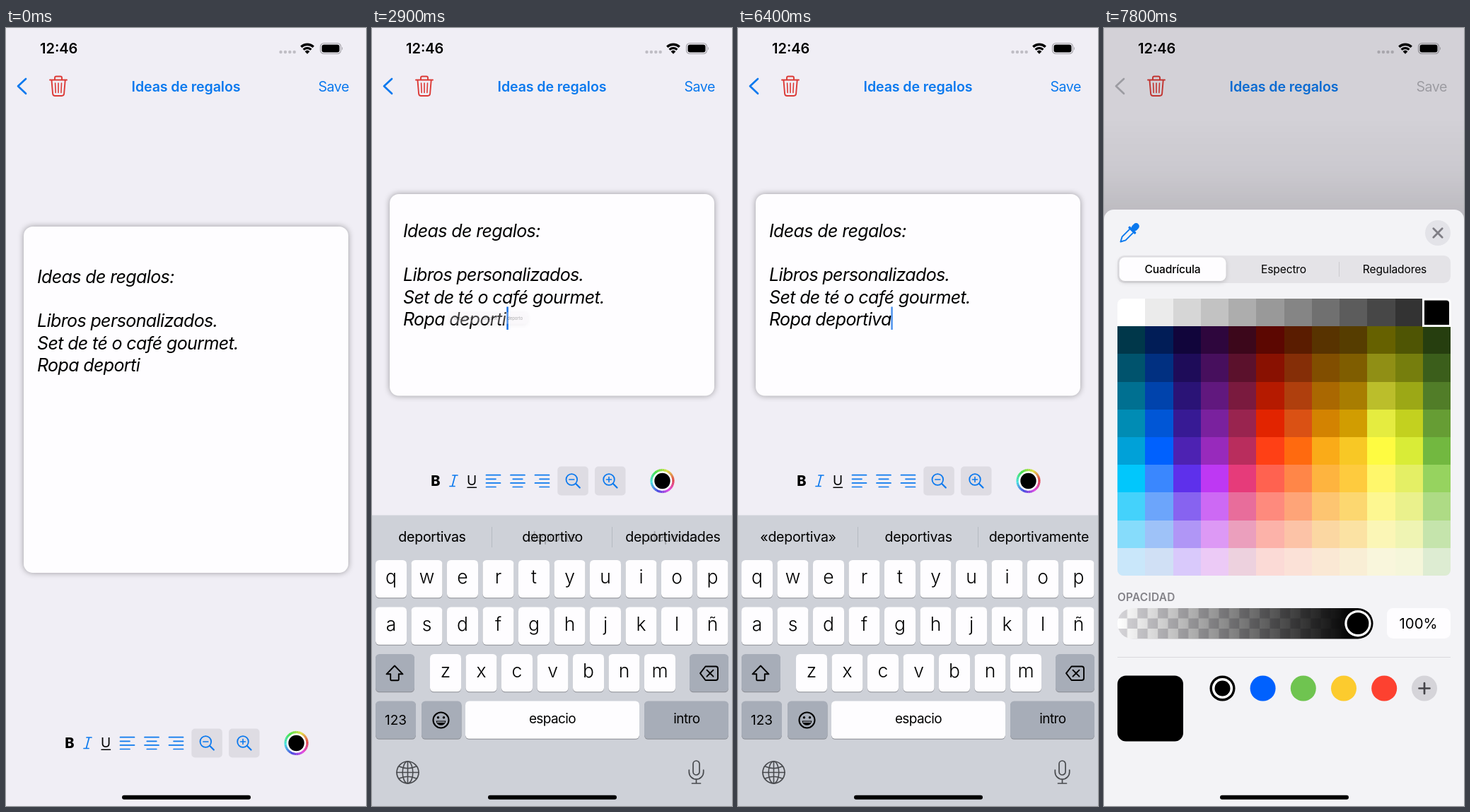
Animation of 509 by 1101 pixels, one loop 8 s. Source, as an HTML page:

```html
<!DOCTYPE html>
<html lang="es">
<head>
<meta charset="utf-8">
<title>Nota</title>
<style>
html, body { margin: 0; width: 100%; height: 100%; overflow: hidden; background: #f0eef5; }
svg { display: block; width: 100%; height: 100%; --blue: #0b79ee; }
text { font-family: Inter, Roboto, sans-serif; white-space: pre; }
.mid { text-anchor: middle; }
.end { text-anchor: end; }
.line { fill: none; stroke: currentColor; stroke-linecap: round; stroke-linejoin: round; }
.blue { color: var(--blue); }
.note text { font-size: 25px; font-style: italic; letter-spacing: -.62px; }
.hint text { font-size: 19.6px; letter-spacing: -.3px; }
.key { filter: drop-shadow(0 1.5px 0 #8a8c92); }

/* Critically damped spring, sampled evenly */
.spring {
  animation: 8s infinite linear(0, .09, .264, .442, .594, .713, .801, .864, .908, .939, .96, .973, .983, .989, 1);
}
.kb { animation-name: kb; }
.bar { animation-name: bar; }
.note { animation-name: note; }
.card { animation-name: card; fill: #fefdff; filter: drop-shadow(0 0 4.5px rgba(0,0,0,.36)); }
@keyframes kb {
  0%, 18.56% { transform: translateY(412px); }
  27.31%, 88.06% { transform: none; }
  96.81%, 100% { transform: translateY(412px); }
}
@keyframes bar {
  0%, 19.28% { transform: translateY(371px); }
  28.03%, 88.06% { transform: none; }
  96.81%, 100% { transform: translateY(371px); }
}
@keyframes note {
  0%, 19.28% { transform: translateY(65px); }
  28.03%, 88.06% { transform: none; }
  96.81%, 100% { transform: translateY(65px); }
}
@keyframes card {
  0%, 19.28% { y: 281px; height: 490px; }
  28.03%, 88.06% { y: 235px; height: 285.5px; }
  96.81%, 100% { y: 281px; height: 490px; }
}

.caret { animation: blink 8s linear infinite, step 8s step-end infinite; }
@keyframes blink {
  0%, 34.99% { opacity: 0; }
  35%, 40.9% { opacity: 1; }
  43.75%, 45.6% { opacity: 0; }
  48.75%, 68.1% { opacity: 1; }
  70.6% { opacity: 0; }
  73.75%, 79.6% { opacity: 1; }
  81.25%, 83.1% { opacity: 0; }
  86.25%, 88.1% { opacity: 1; }
  88.2%, 100% { opacity: 0; }
}
@keyframes step {
  0% { transform: none; }
  52.5% { transform: translateX(13.3px); }
  61.25% { transform: translateX(26px); }
}

.menu { transform-box: fill-box; transform-origin: center; animation: menu 8s ease-out infinite; }
.menu text { font-size: 16.8px; font-style: normal; letter-spacing: -.5px; }
@keyframes menu {
  0%, 22.5% { opacity: 0; transform: translate(-18px, 23.5px) scale(.37); }
  24.8%, 33.9% { opacity: 1; transform: none; }
  36.2%, 38.74% { opacity: .32; transform: translate(-18px, 23.5px) scale(.37); }
  38.75%, 100% { opacity: 0; transform: translate(-18px, 23.5px) scale(.37); }
}

.sheet, .dim, .tint { animation: 8s cubic-bezier(.3, .08, .32, 1) infinite; }
.sheet { animation-name: sheet; }
.dim { animation-name: dim; }
.tint { animation-name: tint; }
@keyframes sheet {
  0%, 92.04% { opacity: 0; transform: translateY(844px); }
  92.05% { opacity: 1; transform: translateY(844px); animation-timing-function: cubic-bezier(.4, .2, .7, .8); }
  93.75% { opacity: 1; transform: translateY(164px); animation-timing-function: ease-out; }
  95%, 97.49% { opacity: 1; transform: translateY(27px); }
  97.5%, 100% { opacity: 1; transform: none; }
}
@keyframes dim {
  0%, 92.05% { opacity: 0; }
  95%, 97.49% { opacity: .116; }
  97.5%, 100% { opacity: .12; }
}
@keyframes tint {
  0%, 92.05% { color: #0b79ee; }
  95%, 100% { color: #b2b1b8; }
}
</style>
</head>
<body>
<svg id="stage" viewBox="0 0 509 1101"></svg>
<script>
const LOOP = 8000;
let rules = '', ruleCount = 0;

// Style that shows an element only between two times in ms
function show(from, to, level = 1) {
  const name = 'show' + ruleCount++;
  const pct = ms => (ms / LOOP * 100).toFixed(3) + '%';
  rules += `@keyframes ${name}{0%{opacity:0}${pct(from)}{opacity:${level}}` +
    (to < LOOP ? `${pct(to)}{opacity:0}` : '') + '}';
  return `style="animation:${name} ${LOOP}ms step-end infinite"`;
}
const text = (x, y, str, attrs = '') => `<text x="${x}" y="${y}" ${attrs}>${str}</text>`;
const mid = (x, y, str, attrs = '') => text(x, y, str, `class="mid" ${attrs}`);
const rect = (x, y, w, h, r, fill, attrs = '') =>
  `<rect x="${x}" y="${y}" width="${w}" height="${h}" rx="${r}" fill="${fill}" ${attrs}/>`;
const disc = (x, y, r, fill) => `<circle cx="${x}" cy="${y}" r="${r}" fill="${fill}"/>`;
const line = (d, width = 2, attrs = '') => `<path class="line" d="${d}" stroke-width="${width}" ${attrs}/>`;
const each = (list, fn) => [...list].map(fn).join('');
const range = (n, fn) => Array.from({ length: n }, (_, i) => fn(i)).join('');

const statusBar = () =>
  text(48, 36, '12:46', 'font-size="20" font-weight="600"') +
  range(4, i => disc(388.5 + i * 6.4, 34, 2.2, '#bfbdc4')) +
  line('M417.3 26.8a12.5 12.5 0 0 1 17.4 0', 3.4, 'style="stroke-linecap:butt"') +
  line('M420.6 30.6a7.8 7.8 0 0 1 10.8 0', 3.2, 'style="stroke-linecap:butt"') +
  '<path d="M426 36.8l-3.4-3.6a5 5 0 0 1 6.8 0z"/>' +
  rect(444.5, 21.5, 29, 15, 5, 'none', 'stroke="#a5a3a9" stroke-width="1.2"') +
  rect(446.5, 23.5, 25, 11, 3.2, '#000') +
  '<path d="M475 26.5q2 2.5 0 5z" fill="#a5a3a9"/>';

const navBar = () =>
  `<g class="tint">${line('M28 72L17 82.3L28 92.7', 2.7)}` +
  text(485, 89.5, 'Save', 'class="end" fill="currentColor" font-size="19.6" letter-spacing="-.45"') + '</g>' +
  '<g color="#dc3a36">' + line('M62 73.5H86M69 73v-2.5q0-2 2-2h6q2 0 2 2V73' +
    'M64.5 74l1.6 19q.3 3 3.3 3h9.4q3 0 3.3-3l1.6-19', 1.9) +
  line('M69.6 78l.6 13.5M74 78v13.5M78.5 78l-.6 13.5', 1.6) + '</g>' +
  mid(254.5, 89.5, 'Ideas de regalos',
    'fill="var(--blue)" font-size="19.6" font-weight="600" letter-spacing="-.1"');

function note() {
  const lines = [296, 358.4, 389.6, 420.8];
  const last = (word, from, to) => text(44, lines[3], 'Ropa ' + word, show(from, to));
  const menu = '<g class="menu">' +
    rect(33, 365, 299, 44, 11, 'rgba(246,244,247,.87)', 'style="filter:drop-shadow(0 4px 10px rgba(0,0,0,.2))"') +
    '<path d="M141 365v44M236.5 365v44" stroke="#dcdadf"/>' +
    mid(87, 393.5, 'deportivo') + mid(188.5, 393.5, 'deporte') + mid(284, 393.5, 'deporto') + '</g>';
  return '<rect class="spring card" x="25" y="281" width="459" height="490" rx="13"/>' +
    '<g class="spring note">' +
    rect(109, 393, 83, 34, 0, '#fccbcd', show(1850, 2800)) +
    rect(107, 393.5, 98.5, 35.5, 0, '#cde3f5', show(4300, 4900)) +
    text(44, lines[0], 'Ideas de regalos:') +
    text(44, lines[1], 'Libros personalizados.') +
    text(44, lines[2], 'Set de té o café gourmet.') +
    last('deporti', 0, 4200) + last('deportiv', 4200, 4900) + last('deportiva', 4900, LOOP) +
    rect(190.3, 394.5, 2.5, 32.5, 0, '#146fe6', 'class="caret"') + menu + '</g>';
}

function toolBar() {
  // Alignment: 0 left, .5 centre, 1 right
  const align = (x, side) => line(range(4, i => {
    const w = i % 2 ? 13.5 : 20;
    return `M${x + (20 - w) * side} ${632.7 + i * 5.6}h${w}`;
  }), 1.7);
  const zoom = (x, sign) => rect(x, 620.5, 43.5, 41, 5, '#dedce3') +
    line(`M${x + 26} ${645}l5.5 5.5`, 2.2) +
    `<circle class="line" cx="${x + 20}" cy="639" r="7.8" stroke-width="1.8"/>` +
    line(`M${x + 16.5} 639h7` + (sign ? `M${x + 20} 635.5v7` : ''), 1.6);
  const ring = range(36, i => `<path d="M-.1 -15.4h2.9" transform="translate(410.5 641) rotate(${i * 10})"
    stroke="hsl(${80 - i * 10} 72% 58%)" stroke-width="3.2"/>`);
  return '<g class="spring bar">' + mid(90, 648.3, 'B', 'font-size="20" font-weight="800"') +
    mid(141, 647, 'U', 'font-size="19"') + line('M135 650.3h12.5', 1.5) +
    '<g class="blue">' + line('M114 633h7M110 648.5h7M117.6 633l-4.2 15.5', 1.7) +
    align(161.5, 0) + align(196, .5) + align(230.5, 1) + zoom(262.3, 0) + zoom(315, 1) + '</g>' +
    disc(410.5, 641, 15, '#fff') + ring + disc(410.5, 641, 11.2, '#000') + '</g>';
}

function keyboard() {
  const pitch = 50.5, grey = '#a7adb8';
  const key = (x, y, w, fill = '#fefdff') => rect(x, y, w, 53.3, 5.5, fill, 'class="key"');
  const row = (letters, x0, y) => each(letters, (c, i) =>
    key(x0 + i * pitch, y, 44) + mid(x0 + 22 + i * pitch, y + 33.3, c, 'font-size="26.5" font-weight="350"'));
  const hints = (words, attrs, boxed) => `<g class="hint" ${attrs}>` +
    (boxed ? rect(170, 697, 170, 46, 6, '#e7e7ec')
      : '<path d="M169.5 706v29M339.5 706v29" stroke="#b6bac2"/>') +
    words.split(' ').map((w, i) => mid(85 + i * 170.2, 727, w)).join('') + '</g>';
  const bubble = (c, x, y, left, from) => `<g ${show(from, from + 120)}>` +
    `<g fill="#fefdff" style="filter:drop-shadow(0 1px 2px rgba(0,0,0,.3))">` +
    `<path d="M${left + 10} ${y - 70}h48q10 0 10 10v38q0 8-6 13L${x + 44} ${y + 8}V${y + 48}q0 5-5 5` +
    `H${x + 5}q-5 0-5-5V${y + 8}L${left + 6} ${y - 9}q-6-5-6-13v-38q0-10 10-10z"/></g>` +
    mid(left + 34, y - 27, c, 'font-size="42" font-weight="300"') + '</g>';
  const first = 'deportivas deporte deporto';
  const small = 'font-size="19" letter-spacing="-.6"';
  return '<g class="spring kb">' + rect(0, 689.5, 509, 420, 0, '#ced1d8') +
    hints(first, show(0, 2900)) + hints(first, show(2900, 3100, .22)) +
    hints('deportivas deportivo deportividades', show(2900, 4300)) +
    hints('«deportiv» deportiva deportivas', show(4300, 5000), true) +
    hints('«deportiva» deportivas deportivamente', show(5000, LOOP)) +
    row('qwertyuiop', 5, 753) + row('asdfghjklñ', 5, 819.5) + row('zxcvbnm', 82, 886) +
    key(5, 886, 55, grey) + key(449, 886, 55, grey) +
    key(5, 952.5, 57, grey) + key(70, 952.5, 56.5, grey) +
    key(132, 952.5, 246, '#fefdff') + key(385, 952.5, 119, grey) +
    line('M32 902.5L43.5 914.3H37.8V922q0 1.3-1.3 1.3h-9q-1.3 0-1.3-1.3v-7.7H20.5z', 1.9) +
    line('M471.5 903.5H486q3 0 3 3V920q0 3-3 3H471.5L464 913.2zM473.5 908.7l9 9M482.5 908.7l-9 9', 1.9) +
    mid(33.5, 986, '123', 'font-size="19"') +
    mid(255, 984, 'espacio', small) + mid(445, 984, 'intro', small) +
    '<circle class="line" cx="97.5" cy="979.5" r="11" stroke-width="2"/>' +
    disc(93.5, 975.8, 1.7, '#000') + disc(101.5, 975.8, 1.7, '#000') +
    '<path d="M90.5 980.5h14q-1.2 6.3-7 6.3t-7-6.3z"/><path d="M92 982.3h11" stroke="#a7adb8" stroke-width="1.4"/>' +
    '<g color="#484a4e"><circle class="line" cx="50.5" cy="1053.5" r="15.5" stroke-width="1.7"/>' +
    '<ellipse class="line" cx="50.5" cy="1053.5" rx="7.3" ry="15.5" stroke-width="1.6"/>' +
    line('M50.5 1038v31M35 1053.5h31M38.5 1045q12 5.5 24 0M38.5 1062q12-5.5 24 0', 1.6) +
    line('M454 1041.5a4.5 4.5 0 0 1 9 0v11a4.5 4.5 0 0 1-9 0zM448.3 1050v3a10.2 10.2 0 0 0 20.4 0v-3' +
      'M458.5 1063.5v5M452.5 1069h12', 1.7) + '</g>' +
    bubble('v', 82 + 3 * pitch, 886, 70 + 3 * pitch, 4150) + bubble('a', 5, 819.5, 3, 4850) + '</g>';
}

// Palette rows given at a few levels; the ones between are mixed
const LEVELS = {
  1: '00374a 011d57 11053b 2e063d 3c071b 5c0701 5a1c00 583300 563d00 666100 4f5504 263e0f',
  4: '008cb4 0056d6 371a94 7a219e 99244f e22400 da5114 d38301 d19d01 e5ec40 c3d11f 669d34',
  5: '00a1d8 0061fe 4d22b2 982abc b92d5d ff4015 ff6a0f faab18 f8c825 fefb41 d9ec37 72b840',
  6: '01c7fc 3a87fe 5e30eb be38f3 e63b7a ff6250 ff8648 feb43f fecb3e fff76b e4ef65 96d35f',
  9: 'c9e7fa d0e0f5 d9c9fb eccaf6 edd1de fbdad6 fbe1d7 fae8d4 f9eed5 f9f6dc f5f6da ddecd2',
};
function palette() {
  const w = 471 / 12, h = 39.2, stops = Object.keys(LEVELS).map(Number);
  const channels = (level, col) => LEVELS[level].split(' ')[col].match(/../g).map(v => parseInt(v, 16));
  const color = (row, col) => {
    if (!row) return `rgb(${Array(3).fill(col == 11 ? 0 : 255 - col * 20.4)})`;
    const hi = stops.find(s => s >= row), lo = stops.findLast(s => s <= row);
    const k = hi == lo ? 0 : (row - lo) / (hi - lo), end = channels(hi, col);
    return `rgb(${channels(lo, col).map((v, i) => Math.round(v + (end[i] - v) * k))})`;
  };
  return '<g clip-path="url(#gridClip)" shape-rendering="crispEdges">' + range(120, i => {
    const row = Math.floor(i / 12), col = i % 12;
    return rect(19 + col * w, 383 + row * h, w + .5, h + .5, 0, color(row, col));
  }) + '</g>' +
    '<path d="M451.5 384H484q5.5 0 5.5 5.5V421.5H451.5z" stroke="#fff" stroke-width="3"/>';
}

function sheet() {
  const tab = (x, str, weight) => mid(x, 347, str, `font-size="15.6" font-weight="${weight}" letter-spacing="-.15"`);
  const swatches = ['#0061fe', '#6fc450', '#fccb2e', '#fd4130'];
  return '<g class="sheet">' + rect(0, 127, 509, 145, 0, 'url(#shade)') +
    rect(0, 257, 509, 1000, 14, '#f3f3f6') +
    '<g class="blue" transform="translate(35.5 290.5) rotate(45)">' +
    rect(-4.5, -18.5, 9, 12, 4.5, 'currentColor') + rect(-7, -8, 14, 3.6, 1.8, 'currentColor') +
    line('M-3.5 -4V10.5L0 17L3.5 10.5V-4', 1.9) + '</g>' +
    disc(472, 290, 18, '#e3e3e8') +
    line('M465.8 283.8l12.4 12.4M478.2 283.8l-12.4 12.4', 2.8, 'color="#7f7e85"') +
    rect(19, 322, 471, 39, 9.5, '#e4e3e7') +
    rect(21.5, 324.5, 151, 33.5, 8, '#fefdff', 'style="filter:drop-shadow(0 2px 3px rgba(0,0,0,.16))"') +
    '<path d="M332.5 331v21" stroke="#cbcace"/>' +
    tab(97, 'Cuadrícula', 500) + tab(254, 'Espectro', 400) + tab(411, 'Reguladores', 400) +
    palette() +
    text(19, 811, 'OPACIDAD', 'font-size="15.4" font-weight="600" fill="#838288" letter-spacing=".25"') +
    rect(19, 821, 361.5, 43.5, 21.7, '#fff') + rect(19, 821, 361.5, 43.5, 21.7, 'url(#checks)') +
    rect(19, 821, 361.5, 43.5, 21.7, 'url(#fade)') +
    disc(359, 842.7, 18.7, '#fff') + disc(359, 842.7, 15.4, '#000') +
    rect(400, 821, 90, 43, 8.5, '#fefdff') + mid(444.5, 850.3, '100%', 'font-size="20.4" letter-spacing="-.05"') +
    '<path d="M19 890.5H490" stroke="#d9d8dd"/>' + rect(19, 916.5, 93, 93, 12, '#000') +
    disc(167.5, 934.5, 18, '#000') + disc(167.5, 934.5, 14.6, '#fff') + disc(167.5, 934.5, 11, '#000') +
    each(swatches, (c, i) => disc(224.6 + i * 57.2, 934.5, 18, c)) +
    disc(453, 934.5, 18, '#d5d4d9') + line('M445.5 934.5h15M453 927v15', 2.7, 'color="#46454a"') + '</g>';
}

const defs = `<defs>
  <clipPath id="gridClip"><rect x="19" y="383" width="471" height="392" rx="8"/></clipPath>
  <linearGradient id="shade" x2="0" y2="1"><stop offset="0" stop-opacity="0"/>
    <stop offset=".5" stop-opacity=".035"/><stop offset=".9" stop-opacity=".1"/><stop offset="1" stop-opacity=".12"/></linearGradient>
  <linearGradient id="fade"><stop offset="0" stop-opacity="0"/><stop offset=".93"/></linearGradient>
  <pattern id="checks" x="18.5" y="821" width="28.8" height="29" patternUnits="userSpaceOnUse">
    <path d="M0 0h14.4v14.5H0zM14.4 14.5h14.4V29H14.4z" fill="#d6d5d9"/></pattern>
</defs>`;

const stage = document.getElementById('stage');
const picture = defs + rect(0, 0, 509, 1101, 0, '#f0eef5') + statusBar() + navBar() + note() + toolBar() + keyboard() +
  rect(0, 0, 509, 1101, 0, '#000', 'class="dim"') + sheet() + rect(164, 1085.7, 182, 6, 3, '#000');
document.head.insertAdjacentHTML('beforeend', `<style>${rules}</style>`);
stage.innerHTML = picture;
</script>
</body>
</html>
```
